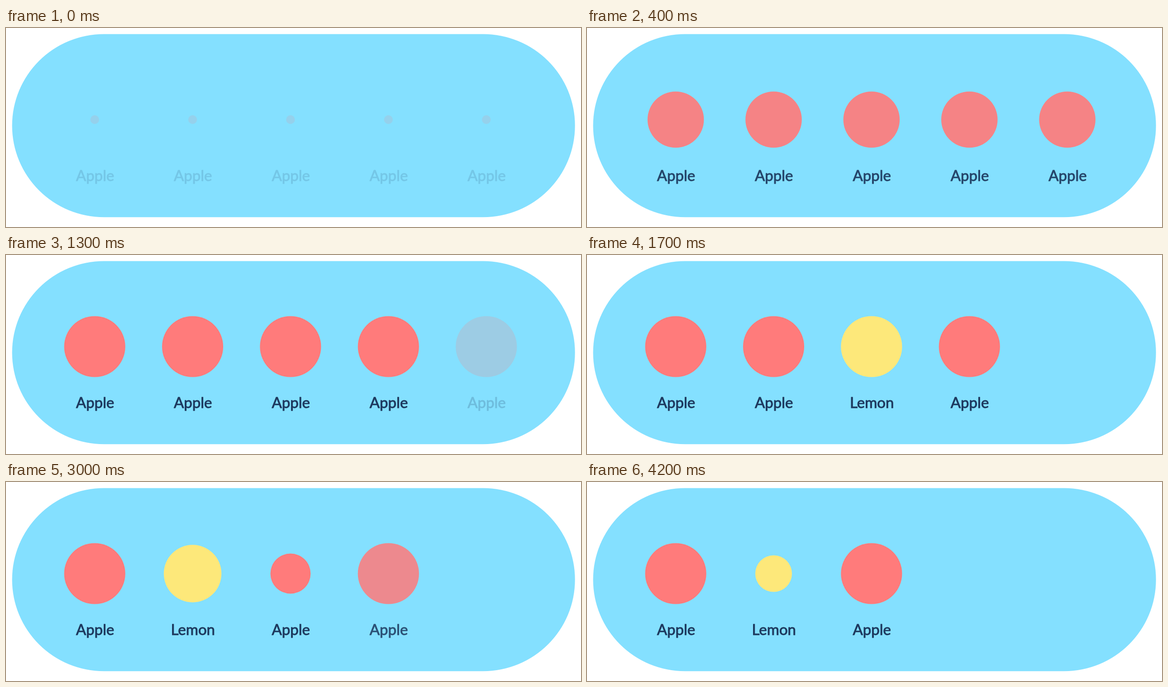
These frames come from a looping animation (1271 px wide and 441 px high, 4.8 s). An HTML page:

```html
<!DOCTYPE html>
<html lang="en">
<head>
<meta charset="utf-8">
<title>Fruit bowl</title>
<style>
  html, body { margin: 0; width: 100%; height: 100%; overflow: hidden; background: #fff; }
  svg { display: block; width: 100%; height: 100%; }
  text {
    font: 400 33px Lato, sans-serif;
    text-anchor: middle;
    fill: #1e3a5f;
    stroke: #1e3a5f;
    stroke-width: 1px;
    stroke-linejoin: round;
  }
</style>
</head>
<body>
<svg viewBox="0 0 1271 441">
  <rect x="13.5" y="13.5" width="1244.2" height="405.7" rx="202.85" fill="#84e0ff"/>
</svg>
<script>
const NS = 'http://www.w3.org/2000/svg';
const LOOP = 4800, STEP = 100, DURATION = 1000;
// Start times of the four bowl updates
const FILL = -330, EAT_LAST = 670, SWAP = 1670, EAT_SECOND = 2670;

const KINDS = {
  apple: { label: 'Apple', color: '#ff7b7b', radius: 67.6 },
  lemon: { label: 'Lemon', color: '#fde87a', radius: 40.56 },
};
const { apple, lemon } = KINDS;

const svg = document.querySelector('svg');

function add(parent, tag, attrs) {
  const node = document.createElementNS(NS, tag);
  setAttrs(node, attrs);
  return parent.appendChild(node);
}

function setAttrs(node, attrs) {
  for (const name in attrs) node.setAttribute(name, attrs[name]);
}

// Each slot holds a kind from a given time on; `exit` is when it starts to fade.
const slots = [
  { changes: [] },
  { changes: [[EAT_SECOND, lemon]] },
  { changes: [[SWAP, lemon], [EAT_SECOND, apple]] },
  { changes: [], exit: EAT_SECOND },
  { changes: [], exit: EAT_LAST },
].map((slot, i) => {
  const x = 196.1 + 216.4 * i;
  const group = add(svg, 'g', {});
  return {
    ...slot,
    group,
    circle: add(group, 'circle', { cx: x, cy: 203 }),
    text: add(group, 'text', { x: x + 0.8, y: 339 }),
  };
});

function cubicInOut(p) {
  return p < 0.5 ? 4 * p ** 3 : 1 - 4 * (1 - p) ** 3;
}

function progress(time, start) {
  return cubicInOut(Math.min(1, Math.max(0, (time - start) / DURATION)));
}

function drawSlot(slot, time) {
  let kind = apple;
  let radius = apple.radius * progress(time, FILL);
  for (const [start, next] of slot.changes) {
    if (time < start) break;
    radius += (next.radius - radius) * progress(time, start);
    kind = next;
  }
  const gone = slot.exit === undefined ? 0 : progress(time, slot.exit);
  setAttrs(slot.group, { opacity: progress(time, FILL) * (1 - gone) });
  setAttrs(slot.circle, { r: radius, fill: kind.color });
  if (slot.text.textContent !== kind.label) slot.text.textContent = kind.label;
}

function render(time) {
  const stepped = Math.floor((time % LOOP) / STEP) * STEP;
  slots.forEach(slot => drawSlot(slot, stepped));
}

const begin = performance.now();
function tick() {
  render(performance.now() - begin);
  requestAnimationFrame(tick);
}
tick();
</script>
</body>
</html>
```
